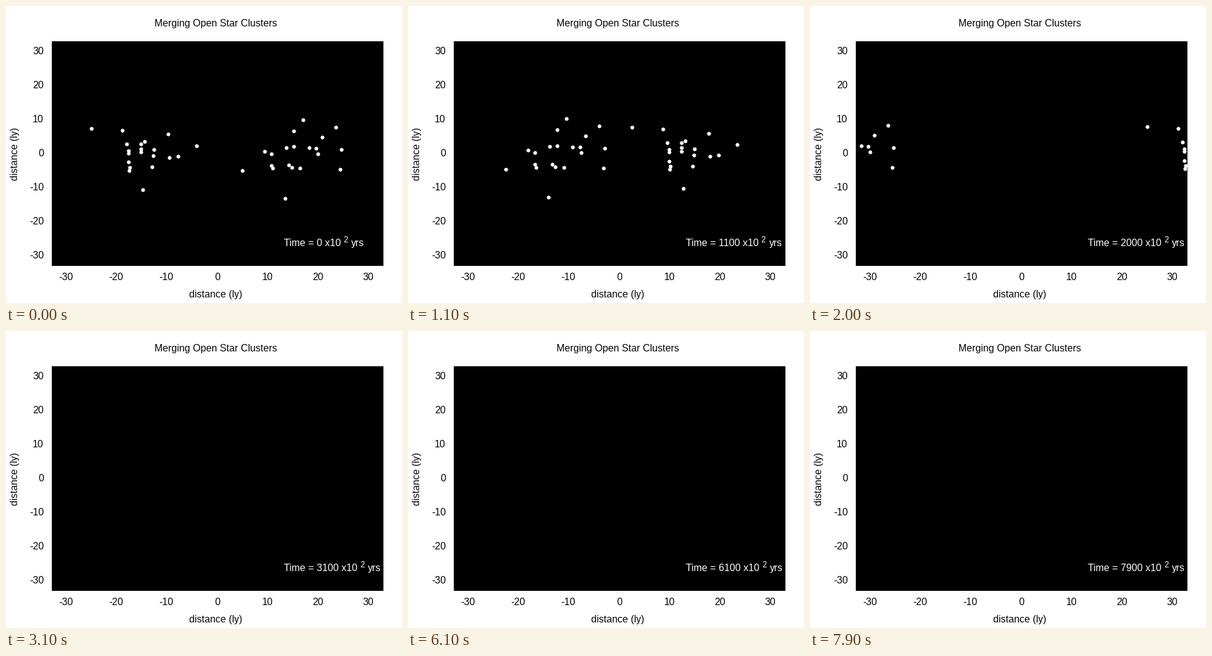
A matplotlib script for the animation above (8000 ms loop, 640 px wide and 480 px high).

```python
import numpy as np
import matplotlib.pyplot as plt
from matplotlib.animation import FuncAnimation

W, H, DPI = 640, 480, 96
FRAMES, STEP_MS = 80, 100
LEFT, TOP, RIGHT, BOTTOM = 74, 57, 610, 420
SPEED, RISE = 20.35, 0.14  # pixels per step
CLUSTER_SIZE = 20

plt.rcParams.update({
    "font.family": "Liberation Sans",
    "text.hinting": "default",
    "text.hinting_factor": 8,
    "toolbar": "None",
})


def cluster(center, spread, outliers, seed):
    """A few outlying stars around a randomly scattered core."""
    rng = np.random.default_rng(seed)
    count = CLUSTER_SIZE - len(outliers)
    scatter = np.clip(rng.normal(size=(count, 2)), -1.6, 1.6)
    scatter = (scatter - scatter.mean(0)) / scatter.std(0)
    return np.vstack([outliers, center + scatter * spread])


west = cluster((224, 237), (22, 15),
               [(138, 198), (188, 201), (195, 223), (199, 266),
                (221, 297), (278, 243), (308, 226)], seed=4)
east = cluster((464, 239), (26, 20),
               [(382, 266), (418, 235), (451, 311), (480, 184),
                (504, 239), (533, 196), (542, 232), (540, 264)], seed=9)

# Star shape: a square with a nub on each side
dot = np.zeros((7, 7), bool)
dot[1:6, 1:6] = True
dot[3, :] = dot[:, 3] = True
DOT_Y, DOT_X = np.nonzero(dot) - np.array(3)


def sky(n):
    panel = np.zeros((BOTTOM - TOP, RIGHT - LEFT))
    stars = np.vstack([west + (SPEED * n, -RISE * n),
                       east + (-SPEED * n, -RISE * n)])
    for x, y in np.rint(stars).astype(int):
        if LEFT <= x < RIGHT:
            px, py = DOT_X + x - LEFT, DOT_Y + y - TOP
            inside = (px >= 0) & (px < panel.shape[1])
            panel[py[inside], px[inside]] = 1
    return panel


fig = plt.figure(figsize=(W / DPI, H / DPI), dpi=DPI, facecolor="white")
ax = fig.add_axes([0, 0, 1, 1])
image = ax.imshow(sky(0), cmap="gray", vmin=0, vmax=1, interpolation="nearest",
                  extent=(LEFT, RIGHT, BOTTOM, TOP), aspect="auto")
ax.set(xlim=(0, W), ylim=(H, 0))
ax.axis("off")


def label(x, y, text, ha="center", px=16, **kw):
    return ax.text(x, y, text, ha=ha, va="baseline",
                   fontsize=px * 72 / DPI, **kw)


label(339.5, 33, "Merging Open Star Clusters")
label(339, 471, "distance (ly)")
label(19, 239.5, "distance (ly)", rotation=90, rotation_mode="anchor")
for v in range(-30, 31, 10):
    label(342 + 8.1 * v - (2.5 if v < 0 else 0), 443, str(v))
    label(61, 243 - 5.5 * v, str(v), ha="right")

clock = label(449, 388, "", ha="left", color="white")
power = label(0, 382, "2", ha="left", px=13, color="white")
unit = label(0, 388, "yrs", ha="left", color="white")


def update(n):
    image.set_data(sky(n))
    clock.set_text(f"Time = {100 * n} x10")
    end = clock.get_window_extent(fig.canvas.get_renderer()).x1
    power.set_x(end + 4)
    unit.set_x(end + 17)
    return image, clock, power, unit


anim = FuncAnimation(fig, update, frames=FRAMES, interval=STEP_MS,
                     repeat=True, repeat_delay=0, blit=False)
plt.show()
```
